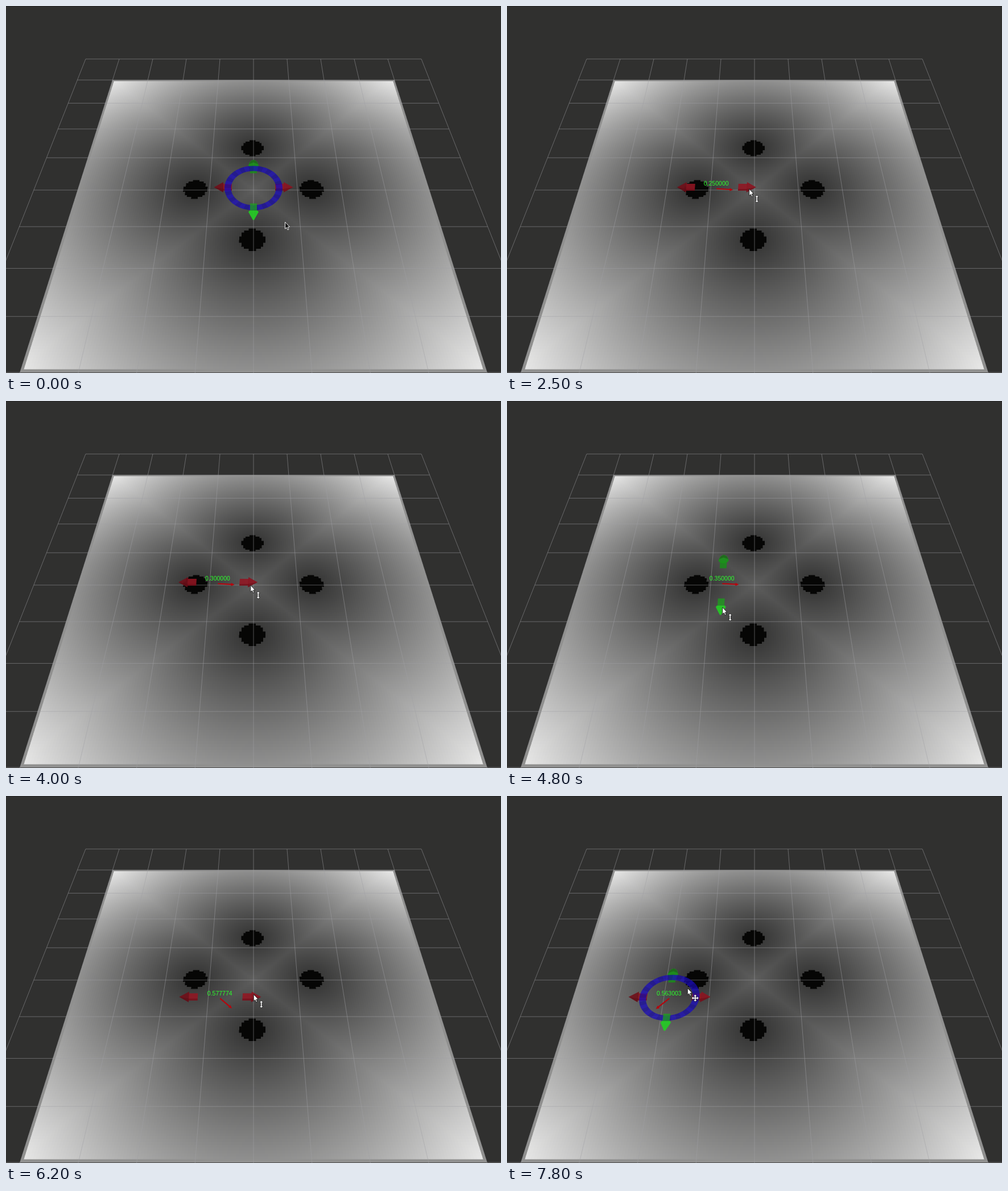
An HTML page with a canvas for the animation above (8 s loop, 870 by 644 pixels).

```html
<!DOCTYPE html>
<html lang="en">
<head>
<meta charset="utf-8">
<title>Distance field marker</title>
<style>
  html, body { margin: 0; width: 100%; height: 100%; overflow: hidden; background: #30302f; }
  canvas { display: block; }
</style>
</head>
<body>
<canvas id="stage" width="870" height="644"></canvas>
<script>
const W = 870, H = 644, LOOP = 8000, STEP = 100;
const CX = 435, HORIZON = -651, UNIT = 0.0793;
const NEAR = 0.0010267, FALL = 0.00006348;
const LIFT = -2.5;

const ctx = document.getElementById('stage').getContext('2d');

// Ground plane <-> screen
const depth = v => 1 / (NEAR - FALL * v);
const project = (x, v) => {
  const s = depth(v);
  return [CX + x * s * UNIT, s + HORIZON];
};

const CELL = 0.05, HALF = 4, CELLS = 160;
const OBSTACLES = [[-1.325, -0.025], [1.325, -0.025], [-0.025, -1.325], [-0.025, 1.325]];

function shade(i, j) {
  if (i === 0 || j === 0 || i === CELLS - 1 || j === CELLS - 1) return 144;
  const x = (i + 0.5) * CELL - HALF, v = (j + 0.5) * CELL - HALF;
  const d = Math.min(...OBSTACLES.map(o => Math.hypot(x - o[0], v - o[1])));
  if (d < 5.2 * CELL) return 6;
  const gap = d - 0.27;
  return Math.min(232, 58 + 33 * gap + 1.3 * gap * gap);
}

function buildScene() {
  const canvas = document.createElement('canvas');
  canvas.width = W;
  canvas.height = H;
  const g = canvas.getContext('2d');
  const field = new Float32Array(CELLS * CELLS);
  for (let j = 0; j < CELLS; j++)
    for (let i = 0; i < CELLS; i++) field[j * CELLS + i] = shade(i, j);

  const sample = (px, py) => {
    const s = py - HORIZON;
    const i = Math.floor(((px - CX) / (s * UNIT) + HALF) / CELL);
    const j = Math.floor(((NEAR - 1 / s) / FALL + HALF) / CELL);
    return i < 0 || j < 0 || i >= CELLS || j >= CELLS ? 48 : field[j * CELLS + i];
  };

  const img = g.createImageData(W, H);
  for (let y = 0, n = 0; y < H; y++) {
    for (let x = 0; x < W; x++, n += 4) {
      const c = (sample(x + 0.25, y + 0.25) + sample(x + 0.75, y + 0.25) +
                 sample(x + 0.25, y + 0.75) + sample(x + 0.75, y + 0.75)) / 4;
      img.data[n] = img.data[n + 1] = c;
      img.data[n + 2] = c - 0.6;
      img.data[n + 3] = 255;
    }
  }
  g.putImageData(img, 0, 0);

  g.strokeStyle = 'rgba(160,160,164,.5)';
  g.lineWidth = 1;
  const line = (a, b) => {
    g.beginPath();
    g.moveTo(...a);
    g.lineTo(...b);
    g.stroke();
  };
  for (let k = -5; k <= 5; k++) {
    line(project(k, -5), project(k, 5));
    line(project(-5, k), project(5, k));
  }
  g.fillStyle = '#242424';
  g.fillRect(0, 0, W, 1);
  return canvas;
}

// Marker stops: time, x, v, reading
const STOPS = [
  [1300, 0, 0, 1.085],
  [1800, -0.335, 0, 0.75],
  [3120, -1.335, 0, -0.210889],
  [3300, -1.335, 0, -0.210889],
  [4100, -0.735, 0, 0.35],
  [4800, -0.735, 0, 0.35],
  [5400, -0.735, 0.555, 0.577774],
  [6200, -0.735, 0.555, 0.577774],
  [6780, -1.335, 0.555, 0.32],
  [7000, -1.559, 0.555, 0.34699],
  [7300, -1.872, 0.555, 0.563003]
];

// Pointer stops: time, offset from the marker on screen
const POINTER = [
  [0, 55, 58.5], [400, 57.5, 27], [700, 57.5, 24], [1000, 55, -2],
  [1800, 58, 0.5], [3200, 56, 0.5], [4100, 57, 3],
  [4300, 40, 19.5], [4400, 40, 19.5], [4700, 0, 41.5], [5500, 0, 42],
  [6100, 58.5, -7], [6200, 58.5, -7], [7000, 63, 2], [7400, 61, 4], [7800, 31.5, -18]
];

const DRAGS = [[1400, 4100, 'red'], [4700, 5500, 'green'], [6200, 7400, 'red']];

// Values of a track at time t, linear between its stops
function at(track, t) {
  const n = track.findIndex(p => p[0] > t);
  if (n <= 0) return track[n ? track.length - 1 : 0].slice(1);
  const a = track[n - 1], b = track[n], f = (t - a[0]) / (b[0] - a[0]);
  return a.slice(1).map((c, i) => c + (b[i + 1] - c) * f);
}

function poly(points, fill) {
  ctx.beginPath();
  points.forEach(p => ctx.lineTo(...p));
  ctx.closePath();
  if (fill) {
    ctx.fillStyle = fill;
    ctx.fill();
  }
}

function redArrow(dir) {
  const p = (x, y) => [x * dir, y - 2.5];
  poly([p(38, -6), p(54, -6), p(54, 6), p(38, 6)], 'rgba(146,22,34,.88)');
  poly([p(38, 3), p(54, 3), p(54, 6), p(38, 6)], 'rgba(90,8,18,.4)');
  poly([p(53, -9), p(69.5, 0), p(53, 9)], dir > 0 ? 'rgba(140,20,32,.9)' : 'rgba(112,16,25,.9)');
  poly([p(53, 9), p(69.5, 0), p(53, 3)], 'rgba(80,8,16,.35)');
}

function greenBack() {
  ctx.fillStyle = 'rgba(26,140,26,.85)';
  ctx.fillRect(-6, -39, 12, 12);
  ctx.beginPath();
  ctx.ellipse(0, -41, 9, 5, 0, 0, Math.PI);
  ctx.lineTo(-7, -46);
  ctx.quadraticCurveTo(0, -55, 7, -46);
  ctx.lineTo(9, -41);
  ctx.fillStyle = 'rgba(24,150,24,.85)';
  ctx.fill();
  poly([[-8, -43], [-5, -48], [0, -50.5], [5, -48], [8, -43], [0, -46]], 'rgba(34,84,28,.6)');
}

function greenFront() {
  ctx.fillStyle = 'rgba(28,160,28,.75)';
  ctx.fillRect(-6, 26, 12, 13);
  poly([[-9, 41], [-7, 38.5], [7, 38.5], [9, 41], [1, 55], [-1, 55]], 'rgba(35,205,35,.9)');
}

function ring() {
  const parts = 36, step = 2 * Math.PI / parts;
  for (let n = 0; n < parts; n++) {
    const a = n * step, b = a + step + 0.004;
    ctx.beginPath();
    ctx.ellipse(0, -1, 51, 39, 0, a, b);
    ctx.ellipse(0, -1, 39.5, 30, 0, b, a, true);
    ctx.fillStyle = n % 2 ? 'rgba(26,12,188,.76)' : 'rgba(22,10,160,.76)';
    ctx.fill();
  }
}

function handles(x, v, axis) {
  const s = depth(v), k = s / depth(0);
  const [px, py] = project(x, v);
  ctx.save();
  ctx.transform(k, 0, k * (px - CX) / s, k, px, py + LIFT);
  if (axis !== 'red') greenBack();
  if (axis !== 'green') {
    redArrow(-1);
    redArrow(1);
  }
  if (!axis) ring();
  if (axis !== 'red') greenFront();
  ctx.restore();
}

// Arrow pointing away from the nearest obstacle
function gradient(x, v) {
  const dx = x + 1.335, dv = v + 0.0391, len = 0.38 / Math.hypot(dx, dv);
  const [ax, ay] = project(x, v), [bx, by] = project(x + dx * len, v + dv * len);
  const long = Math.hypot(bx - ax, by - ay);
  ctx.save();
  ctx.translate(ax, ay + LIFT);
  ctx.rotate(Math.atan2(by - ay, bx - ax));
  poly([[0, -1.1], [long - 6, -1.1], [long - 6, -2.8], [long, 0],
        [long - 6, 2.8], [long - 6, 1.1], [0, 1.1]], '#b4060e');
  ctx.restore();
}

function label(x, v, reading) {
  // along the obstacle's row the reading moves in whole cells
  const value = v === 0 && reading > 0 ? Math.round(reading / CELL) * CELL : reading;
  const [px, py] = project(x, v);
  ctx.font = '10.5px "Liberation Sans", Arial, sans-serif';
  ctx.textAlign = 'center';
  ctx.fillStyle = '#2cff2c';
  ctx.fillText(value.toFixed(6), px - 0.5, py - 7.5);
}

// Double arrow, or four-way arrow when the pointer is off the handles
function badge(turns) {
  const arms = paint => {
    for (let n = 0; n < turns; n++) {
      ctx.save();
      ctx.rotate(n * 2 * Math.PI / turns);
      poly([[-0.8, 0.3], [-0.8, -3.4], [-2.6, -3.4], [0, -6], [2.6, -3.4], [0.8, -3.4], [0.8, 0.3]]);
      paint();
      ctx.restore();
    }
  };
  ctx.translate(14, 17.5);
  ctx.lineWidth = 1.4;
  ctx.strokeStyle = 'rgba(30,30,30,.7)';
  ctx.fillStyle = '#fff';
  arms(() => ctx.stroke());
  arms(() => ctx.fill());
}

function pointer(x, y, idle, turns) {
  ctx.save();
  ctx.translate(x, y);
  poly([[0.5, 0], [0.5, 12], [3.2, 9.6], [5, 13.8], [7, 13], [5.2, 8.9], [8.6, 8.6]],
    idle ? '#161616' : '#fff');
  ctx.lineWidth = 1;
  ctx.lineJoin = 'round';
  ctx.strokeStyle = idle ? '#eee' : '#222';
  ctx.stroke();
  if (!idle) badge(turns);
  ctx.restore();
}

const scene = buildScene();

function draw(now) {
  const t = Math.floor(now % LOOP / STEP) * STEP;
  const [x, v, reading] = at(STOPS, t);
  const [dx, dy] = at(POINTER, t);
  const [px, py] = project(x, v);
  const drag = DRAGS.find(d => t >= d[0] && t < d[1]);
  const onHandle = (dx > 52 && Math.abs(dy) < 8) || (Math.abs(dx) < 8 && dy > 38);

  ctx.drawImage(scene, 0, 0);
  handles(x, v, drag && drag[2]);
  if (t >= DRAGS[0][0]) {
    gradient(x, v);
    label(x, v, reading);
  }
  pointer(px + dx, py + LIFT + dy, t < STEP, onHandle ? 2 : 4);
}

const start = performance.now();
function tick() {
  draw(performance.now() - start);
  requestAnimationFrame(tick);
}
tick();
</script>
</body>
</html>
```
